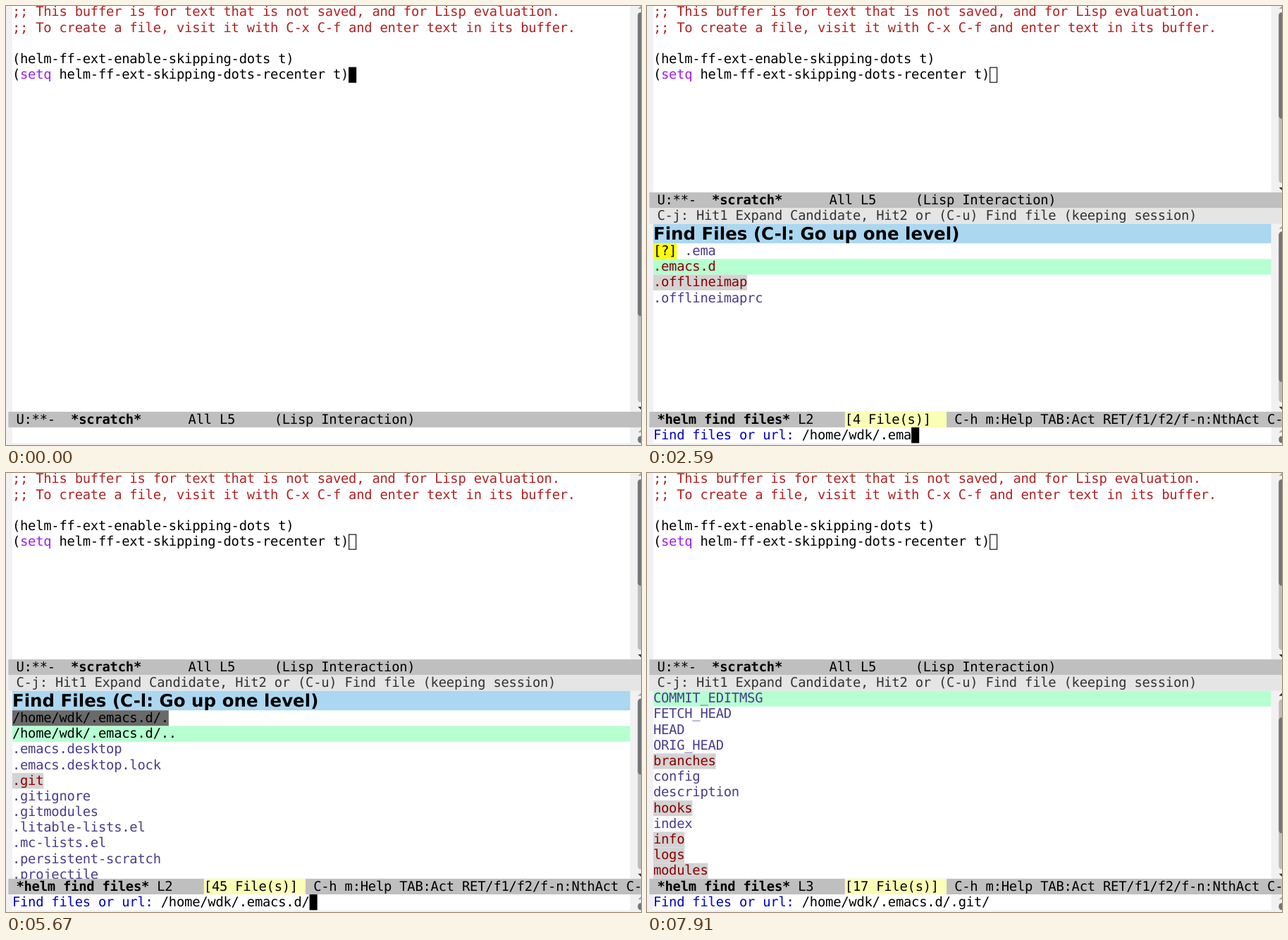
An HTML page with a canvas for the animation above (8 s loop, 901 by 622 pixels).

```html
<!DOCTYPE html>
<html lang="en">
<head>
<meta charset="utf-8">
<title>Helm find files</title>
<style>
html, body { margin: 0; width: 100%; height: 100%; overflow: hidden; background: #f1f1f1; }
canvas { display: block; }
</style>
</head>
<body>
<canvas id="stage" width="901" height="622"></canvas>
<script>
const ctx = document.getElementById('stage').getContext('2d');
// The layout uses character cells of 10 by 20 units, enlarged by SCALE.
const LOOP = 8000, SCALE = 1.1098, CELL = 10, ROW = 20;
const LEFT = 8, RIGHT = 798, EDGE = 3, END = 812;
const SPLIT = 238, HINT = 258, LIST = 278, MODE = 518, MINI = 538;
const MONO = '17px "DejaVu Sans Mono", monospace';
const FILE = '#483d8b', DIR = '#8b0000', GREEN = '#b5ffd1', FRINGE = '#f1f1f1';
const HOME = '/home/wdk/', CONF = HOME + '.emacs.d/';

// Row prefixes: "/" directory, "*" executable, "@" dotted path, "?" unknown name
const homeRows = ['.ICEauthority', '.Xauthority', '.Xresources', '/.aspell', '.bash_history',
  '.bash_logout', '.bash_profile', '.bashrc', '/.cabal', '/.cache', '/.config', '/.cpan'];
const dotRows = ['/.m2', '/.mu', '/.gem', '/.ghc', '/.npm', '/.pip', '/.pki', '*.rdm', '.rnd',
  '/.rvm', '/.sbt', '/.ssh'];
const mailRows = ['/.emacs.d', '/.offlineimap', '.offlineimaprc'];
const confRows = ['.emacs.desktop', '.emacs.desktop.lock', '/.git', '.gitignore', '.gitmodules',
  '.litable-lists.el', '.mc-lists.el', '.persistent-scratch', '.projectile', 'README.org',
  'abbrev_defs', '/anaconda-mode'];
const gitRows = ['COMMIT_EDITMSG', 'FETCH_HEAD', 'HEAD', 'ORIG_HEAD', '/branches', 'config',
  'description', '/hooks', 'index', '/info', '/logs', '/modules'];

const on = { cursor: true }, off = { cursor: false };
const select = n => ({ line: n, sel: n - 1 });

// Each step changes only the fields it names.
const steps = [
  [0, { cursor: true, helm: false }],
  [350, off],
  [840, { helm: true, cursor: true, input: HOME, count: 139, line: 3, sel: 0, head: false,
          rows: homeRows, bar: [291, 339] }],
  [1330, off],
  [1890, { input: HOME + '.', cursor: true }],
  [1960, { rows: dotRows }],
  [2170, { input: HOME + '.e', head: true, count: 21, ...select(2), bar: [288, 413],
           rows: ['?.e', '/.gem', '.gemrc', '/.lein', '/.cache', '/.emacs.d', '/.gnome2',
                  '.viminfo.el', '/.offlineimap', '.offlineimaprc', '.wget-hsts'] }],
  [2310, { input: HOME + '.em', count: 6, bar: [288, 480],
           rows: ['?.em', '/.gem', '.gemrc', ...mailRows] }],
  [2520, { input: HOME + '.ema' }],
  [2590, { count: 4, rows: ['?.ema', ...mailRows] }],
  [2940, { input: HOME + '.emac' }],
  [3010, { count: 2, rows: ['?.emac', '/.emacs.d'], ...select(1), bar: [288, 505] }],
  [3080, select(2)],
  [3570, { input: CONF }],
  [3640, { head: false, count: 45, line: 3, sel: 0, rows: confRows, bar: [301, 396] }],
  [4130, off],
  [4550, { cursor: true, head: true, ...select(2), bar: [288, 385],
           rows: ['@' + CONF + '.', '@' + CONF + '..', ...confRows] }],
  [4970, select(1)],
  [5460, off],
  [5600, on],
  [5670, select(2)],
  [6020, select(3)],
  [6440, select(4)],
  [6790, select(5)],
  [7280, off],
  [7420, { input: CONF + '.git/', cursor: true, head: false, count: 17, line: 3, sel: 0,
           rows: gitRows, bar: [312, 460] }],
  [7910, off]
];

function rect(x0, y0, x1, y1, color) {
  ctx.fillStyle = color;
  ctx.fillRect(x0, y0, x1 - x0, y1 - y0);
}

function text(str, x, top, color = '#000', bold = false) {
  ctx.font = (bold ? 'bold ' : '') + MONO;
  ctx.letterSpacing = '0px';
  ctx.letterSpacing = CELL - ctx.measureText('0').width + 'px';
  ctx.fillStyle = color;
  ctx.fillText(str, x, top + 15);
}

function arrow(y, dir, color) {
  ctx.fillStyle = color;
  ctx.beginPath();
  ctx.moveTo(808, y - dir * 2);
  ctx.lineTo(818, y - dir * 2);
  ctx.lineTo(813, y + dir * 3);
  ctx.fill();
}

function pill(y0, y1, color) {
  ctx.fillStyle = color;
  ctx.beginPath();
  ctx.roundRect(807.7, y0, 11, y1 - y0, 4);
  ctx.fill();
}

function scrollBar(top, bottom, thumb) {
  const moved = thumb[0] > top + 12;
  arrow(top + 4.5, -1, moved ? '#303030' : '#a8a8a8');
  pill(top + 11, bottom - 12, '#bcbcbc');
  pill(thumb[0], thumb[1], '#72767a');
  arrow(bottom - 4.5, 1, '#303030');
}

function cursor(col, top, hollow) {
  const x = LEFT + col * CELL;
  if (!hollow) return rect(x, top, x + CELL, top + ROW, '#000');
  ctx.strokeStyle = '#000';
  ctx.lineWidth = 1;
  ctx.strokeRect(x + .5, top + .5, CELL - 1, ROW - 1);
}

function modeLine(top) {
  rect(EDGE, top, END, top + ROW, '#bfbfbf');
}

function scratchMode(top) {
  modeLine(top);
  text(' U:**-', EDGE, top);
  text('*scratch*', EDGE + 8 * CELL, top, '#000', true);
  text('All L5     (Lisp Interaction)', EDGE + 23 * CELL, top);
}

function scratch(s) {
  const y = i => i * ROW - 2;
  text(';; This buffer is for text that is not saved, and for Lisp evaluation.', LEFT, y(0), '#b22222');
  text(';; To create a file, visit it with C-x C-f and enter text in its buffer.', LEFT, y(1), '#b22222');
  text('(helm-ff-ext-enable-skipping-dots t)', LEFT, y(3));
  text('(', LEFT, y(4));
  text('setq', LEFT + CELL, y(4), '#a020f0');
  text('helm-ff-ext-skipping-dots-recenter t)', LEFT + 6 * CELL, y(4));
  if (s.helm || s.cursor) cursor(43, y(4), s.helm);
}

function candidate(row, top, selected) {
  const kind = '/*@?'.includes(row[0]) ? row[0] : '';
  const name = kind ? row.slice(1) : row;
  const back = { '/': '#d3d3d3', '@': '#696969' }[kind];
  if (selected) rect(LEFT, top, RIGHT, top + ROW, GREEN);
  else if (back) rect(LEFT, top, LEFT + name.length * CELL, top + ROW, back);
  if (kind === '?') {
    rect(LEFT, top, LEFT + 3 * CELL, top + ROW, '#ffff00');
    text('[?]', LEFT, top);
    text(name, LEFT + 4 * CELL, top, FILE);
  } else {
    text(name, LEFT, top, { '/': DIR, '*': '#00ff00', '@': '#000' }[kind] || FILE);
  }
}

function helm(s) {
  let top = LIST;
  rect(LEFT, top, RIGHT, MODE, '#fff');
  if (s.head) {
    rect(LEFT, top, RIGHT, top + 25, '#abd7f0');
    ctx.font = 'bold 22.1px "DejaVu Sans", sans-serif';
    ctx.letterSpacing = '0px';
    ctx.fillStyle = '#000';
    ctx.fillText('Find Files (C-l: Go up one level)', LEFT, top + 20);
    top += 25;
  }
  s.rows.forEach((row, i) => {
    if (top + i * ROW < MODE) candidate(row, top + i * ROW, i === s.sel);
  });
  rect(EDGE, HINT, END, LIST, '#e5e5e5');
  text(' C-j: Hit1 Expand Candidate, Hit2 or (C-u) Find file (keeping session)', EDGE, HINT, '#333');

  modeLine(MODE);
  text('*helm find files*', EDGE + CELL, MODE, '#000', true);
  text('L' + s.line, EDGE + 19 * CELL, MODE);
  rect(EDGE + 25 * CELL, MODE, EDGE + 38 * CELL, MINI, '#faffb5');
  text(`[${s.count} File(s)]`, EDGE + 25 * CELL, MODE);
  text('C-h m:Help TAB:Act RET/f1/f2/f-n:NthAct C-', EDGE + 39 * CELL, MODE);

  const prompt = 'Find files or url: ';
  rect(0, MINI, RIGHT, MINI + ROW, FRINGE);
  rect(LEFT, MINI, RIGHT, MINI + ROW, '#fff');
  text(prompt, LEFT, MINI, '#0000cd');
  text(s.input, LEFT + prompt.length * CELL, MINI);
  if (s.cursor) cursor(prompt.length + s.input.length, MINI);
}

function draw(s) {
  rect(0, 0, END, 561, FRINGE);
  rect(LEFT, 0, RIGHT, s.helm ? SPLIT : MODE, '#fff');
  rect(LEFT, MINI, RIGHT, MINI + ROW, '#fff');
  scratch(s);
  if (s.helm) {
    scrollBar(-3, SPLIT, [8, 144]);
    scrollBar(LIST, MODE, s.bar);
    scratchMode(SPLIT);
    helm(s);
  } else {
    scrollBar(-3, MODE, [8, 396]);
    scratchMode(MODE);
  }
  arrow(542.5, -1, '#a8a8a8');
  pill(549, 558, '#72767a');
}

function stateAt(t) {
  return Object.assign({}, ...steps.filter(([start]) => start <= t).map(([, change]) => change));
}

ctx.scale(SCALE, SCALE);
ctx.textRendering = 'geometricPrecision';
const begin = performance.now();
function tick() {
  draw(stateAt((performance.now() - begin) % LOOP));
  requestAnimationFrame(tick);
}
tick();
</script>
</body>
</html>
```
